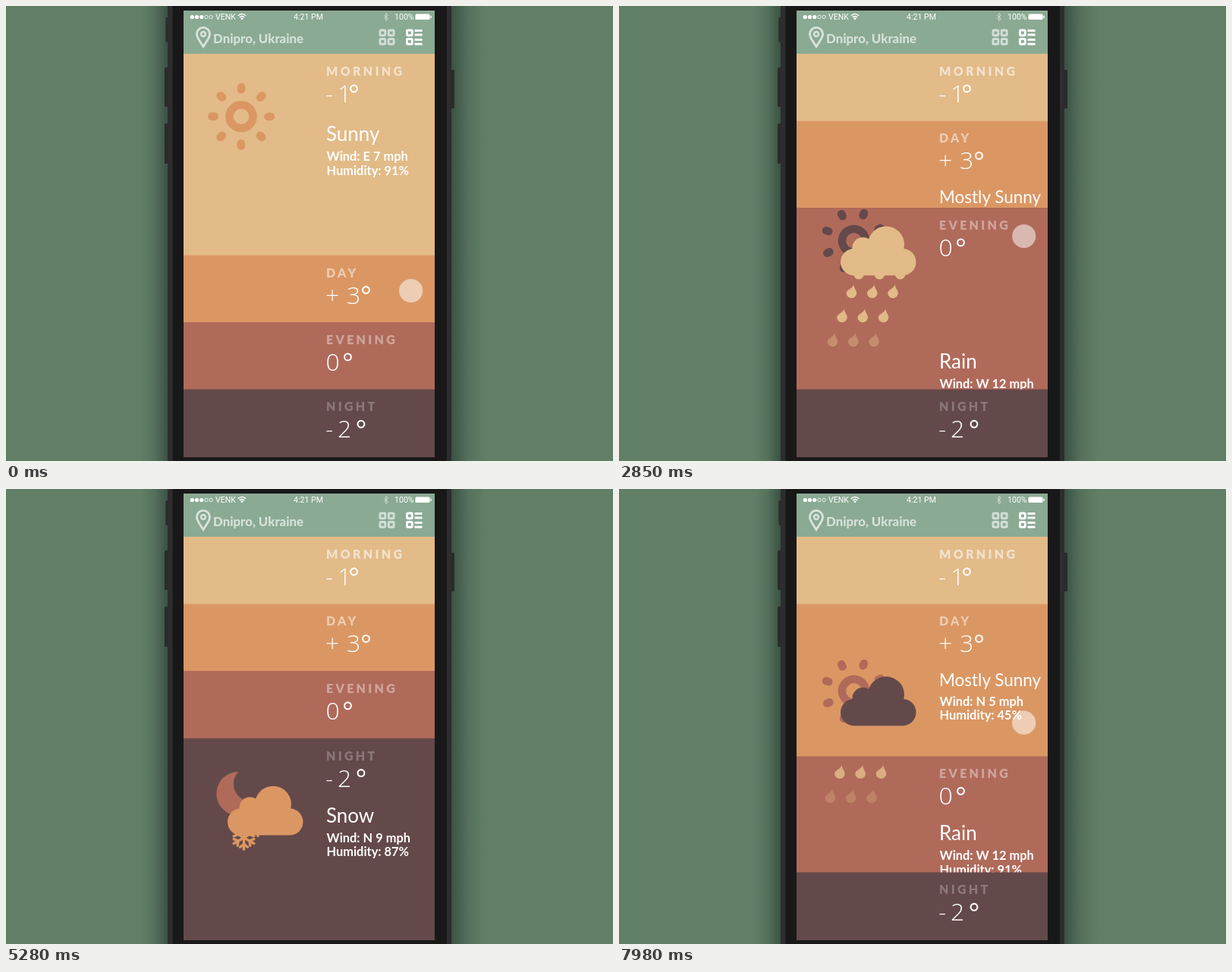
Write an HTML page that moves like this. It is 800x600 px and loops after 8 s.

```html
<!DOCTYPE html>
<html lang="en">
<head>
<meta charset="utf-8">
<title>Weather cards</title>
<style>
  html, body { margin: 0; width: 100%; height: 100%; overflow: hidden; background: #617f67; }
  #stage { display: block; width: 800px; height: 600px; }
  text { font-family: Lato, "Open Sans", sans-serif; fill: #fff; }
  .status { font: 10.6px Roboto, sans-serif; }
  .place { font-size: 16.8px; font-weight: 800; fill-opacity: .65; }
  .label { font-size: 16px; font-weight: 900; letter-spacing: 3.3px; }
  .temp { font: 300 32px "Open Sans", "Noto Sans", sans-serif; }
  .sky { font-weight: 400; }
  .info { font-size: 16.4px; font-weight: 700; }
</style>
</head>
<body>
<svg id="stage" viewBox="0 0 800 600"></svg>
<script>
const LOOP = 8000;
const UNIT = 88.4, GROW = 177.1, FIRST_TOP = 63, BOTTOM = 595;
const SAND = '#e2bb88', ORANGE = '#db9763', RED = '#b06a5a', PLUM = '#64494a';

const CARDS = [
  { name: 'MORNING', fill: SAND, tint: .58, sign: '-', digit: '1', digitX: 437, ring: 458.5,
    sky: 'Sunny', size: 26, base: 115, wind: 'E 7', humid: 91 },
  { name: 'DAY', fill: ORANGE, tint: .5, sign: '+', digit: '3', digitX: 449, ring: 474.5,
    sky: 'Mostly Sunny', size: 22.5, base: 108.5, wind: 'N 5', humid: 45 },
  { name: 'EVENING', fill: RED, tint: .4, sign: '', digit: '0', digitX: 421.5, ring: 450.5,
    sky: 'Rain', size: 26, base: 111, wind: 'W 12', humid: 91 },
  { name: 'NIGHT', fill: PLUM, tint: .26, sign: '-', digit: '2', digitX: 437, ring: 468,
    sky: 'Snow', size: 26, base: 111, wind: 'N 9', humid: 87 }
];

// step: cards opened or closed; lead: how long the finger rests before the drag
const DRAGS = [
  { at: 270, step: 1, y: 375.5, lead: 450 },
  { at: 2070, step: 1, y: 464, lead: 420 },
  { at: 3870, step: 1, y: 552.3, lead: 420 },
  { at: 5670, step: -1, y: 283, lead: 170 },
  { at: 7470, step: -1, y: 198, lead: 170 }
];

const clamp = (v, lo = 0, hi = 1) => Math.min(hi, Math.max(lo, v));
const wrap = v => v - Math.floor(v);

// cubic-bezier(x1, 0, x2, 1)
const bezier = (x1, x2) => x => {
  if (x <= 0) return 0;
  if (x >= 1) return 1;
  let lo = 0, hi = 1;
  for (let i = 0; i < 24; i++) {
    const s = (lo + hi) / 2, r = 1 - s;
    if (3 * r * r * s * x1 + 3 * r * s * s * x2 + s ** 3 < x) lo = s; else hi = s;
  }
  return lo * lo * (3 - 2 * lo);
};
const slide = bezier(.3, .1);
const follow = bezier(.3, .25);

const rect = (x, y, w, h, fill, extra = '') =>
  `<rect x="${x}" y="${y}" width="${w}" height="${h}" fill="${fill}" ${extra}/>`;
const circle = (x, y, r, extra = '') => `<circle cx="${x}" cy="${y}" r="${r}" ${extra}/>`;
const repeat = (n, make) => Array.from({ length: n }, (_, i) => make(i)).join('');

// Icons are drawn around the sun's centre
const sun = color => `<g class="sun" fill="${color}">
  ${circle(0, 0, 15.5, `fill="none" stroke="${color}" stroke-width="10.5"`)}
  ${repeat(8, i => rect(-5.3, -44, 10.6, 13.8, color, `rx="5.2" transform="rotate(${i * 45})"`))}</g>`;

const cloud = color => `<g fill="${color}">
  ${rect(-17.5, 10.6, 99.5, 35.2, color, 'rx="17.6"')}
  ${circle(42.5, 5, 24)}${circle(12, 9.5, 14)}${rect(12, 8, 52, 30, color)}</g>`;

const drops = color => repeat(5, () => `<g class="rain" fill="${color}">${repeat(3, i =>
  `<path transform="translate(${i * 27.3})" d="M3-11C3-6 6.8-4 6.8 0A6.8 6.8 0 0 1-6.8 0C-6.8-4 0-5 3-11Z"/>`)}</g>`);

const flakes = color => repeat(3, () =>
  `<g class="snow" fill="none" stroke="${color}" stroke-width="3.4" stroke-linecap="round">${repeat(6, i =>
    `<path transform="rotate(${i * 60})" d="M0 0V15.4M-5 12.5L0 8.5L5 12.5"/>`)}</g>`);

const moon = color =>
  `<path fill="${color}" d="M-3-38A29 29 0 1 0 25-2A23 23 0 0 1-3-38Z"/>`;

const ICONS = [
  sun(ORANGE),
  sun(RED) + cloud(PLUM),
  sun(PLUM) + drops(SAND) + cloud(SAND),
  moon(RED) + flakes(ORANGE) + cloud(ORANGE)
];

const cardMarkup = (c, i) => `<svg class="card" width="800" height="540">
  ${rect(234, 0, 331, 540, c.fill)}
  <g class="icon">${ICONS[i]}</g>
  <text class="label" x="422" y="29" fill-opacity="${c.tint}">${c.name}</text>
  <text class="temp" x="421" y="64">${c.sign}</text>
  <text class="temp" x="${c.digitX}" y="64">${c.digit}</text>
  ${circle(c.ring, 46, 4.4, 'fill="none" stroke="#fff" stroke-width="2.1"')}
  <g class="detail">
    <text class="sky" x="422" y="${c.base}" font-size="${c.size}">${c.sky}</text>
    <text class="info" x="422.5" y="${c.base + 26}">Wind: ${c.wind} mph</text>
    <text class="info" x="422.5" y="${c.base + 44.5}">Humidity: ${c.humid}%</text>
  </g></svg>`;

const box = (x, y) => rect(x, y, 6.8, 6.8, 'none', 'rx="1.2" stroke="#fff" stroke-width="2.9"');

const backdrop = `
  <defs>
    <linearGradient id="fade"><stop stop-color="#2f4438" stop-opacity="0"/>
      <stop offset=".5" stop-color="#2f4438" stop-opacity=".25"/>
      <stop offset="1" stop-color="#2f4438" stop-opacity=".8"/></linearGradient>
    <clipPath id="screen">${rect(234, 6, 331, BOTTOM - 6, '#000')}</clipPath>
  </defs>
  ${rect(0, 0, 800, 600, '#617f67')}
  ${rect(178, 0, 36, 600, 'url(#fade)')}
  ${rect(0, 0, 46, 600, 'url(#fade)', 'transform="matrix(-1 0 0 1 632 0)"')}
  ${[[210.5, 15, 33], [209, 81, 52], [209, 155, 53], [583, 84, 51]].map(([x, y, h]) =>
    rect(x, y, 8, h, '#2b2a2c', 'rx="1.5"')).join('')}
  ${rect(213, 0, 374, 600, '#2d2c2f')}
  ${rect(219.5, 0, 361.5, 600, '#191819')}`;

const header = `${rect(234, 6, 331, 57, '#8aaa93')}
  ${repeat(5, i => circle(245.3 + i * 6.2, 14.5, i < 3 ? 2.6 : 2.2,
    i < 3 ? 'fill="#fff"' : 'fill="none" stroke="#fff" stroke-width=".8"'))}
  <text class="status" x="276" y="18">VENK</text>
  <g fill="none" stroke="#fff" stroke-width="1.5">
    <path d="M305.8 12.8Q311 8.2 316.2 12.8M307.8 15Q311 12.2 314.2 15"/></g>
  <path d="M309 16.2Q311 14.8 313 16.2L311 18.4Z" fill="#fff"/>
  <text class="status" x="379" y="18">4:21 PM</text>
  <path d="M498 11.8L503.5 17L500.8 19.5V9.5L503.5 12L498 17.2" fill="none" stroke="#fff" stroke-opacity=".55"/>
  <text class="status" x="512" y="18">100%</text>
  ${rect(539.5, 10.5, 19, 7.6, '#fff', 'rx="1.5"')}${rect(559.3, 12.8, 1.4, 3.2, '#fff')}
  <g fill="none" stroke="#fff" stroke-opacity=".68" stroke-width="2.8">
    <path d="M260 53.5C256 47 251.4 42 251.4 37A8.6 8.6 0 0 1 268.6 37C268.6 42 264 47 260 53.5Z"/>
    ${circle(260, 37, 3, 'stroke-width="2.4"')}</g>
  <text class="place" x="273" y="48.5">Dnipro, Ukraine</text>
  <g opacity=".62">${box(493, 32)}${box(504.3, 32)}${box(493, 43.5)}${box(504.3, 43.5)}</g>
  ${box(528.5, 32)}${box(528.5, 43.5)}
  ${[31, 36.5, 43, 48.7].map(y => rect(538.5, y, 10, 2.9, '#fff')).join('')}`;

const stage = document.getElementById('stage');
stage.innerHTML = `${backdrop}${header}
  <g clip-path="url(#screen)">${CARDS.map(cardMarkup).join('')}</g>
  ${circle(533.7, 0, 15.6, 'id="touch" fill="#fff"')}`;

const all = (selector, root = stage) => [...root.querySelectorAll(selector)];
const cards = all('.card').map(el => ({
  el, icon: el.querySelector('.icon'), detail: el.querySelector('.detail'), sun: el.querySelector('.sun')
}));
const rain = all('.rain'), snow = all('.snow'), touch = document.getElementById('touch');
const move = (el, x, y) => el.setAttribute('transform', `translate(${x} ${y})`);

function drawCards(t) {
  const open = DRAGS.reduce((sum, d) => sum + d.step * slide((t - d.at) / 1510), 0);
  const iconY = FIRST_TOP + 82.7 + UNIT * open;
  cards.forEach((card, k) => {
    const top = FIRST_TOP + UNIT * k + GROW * clamp(k - open);
    card.el.setAttribute('y', top);
    move(card.icon, k ? 309.5 : 310, iconY - top);
    if (card.sun) card.sun.setAttribute('transform', `rotate(${t / 6 - (k ? 5 : 0)})`);

    let hidden = k ? 1 - slide((t - DRAGS[k - 1].at - 680) / 355) : 0;
    if (k === 3) hidden += slide((t - 5700) / 360);
    move(card.detail, 0, 212 * hidden);
  });
}

function drawRain(t) {
  const phase = wrap((t - 7470) / 360);
  rain.forEach((row, i) => {
    const age = phase + i;
    const y = age < 1 ? 42 + 12 * age + 9.5 * age * age : 63.5 + 32 * (age - 1);
    move(row, -3.5 - (y - 70) * .39, y);
    row.setAttribute('opacity', clamp((158 - y) / 58));
  });
}

function drawSnow(t) {
  snow.forEach((flake, i) => {
    const age = wrap((t - 4410) / 1200 + .3 - i / 3);
    move(flake, [22.5, 50, 4][i], 30 + 53 * age);
    flake.setAttribute('opacity', clamp((.6 - age) / .15));
  });
}

function drawTouch(t) {
  const drag = DRAGS.find(d => t >= d.at - d.lead && t < d.at + 1250);
  if (!drag) return touch.setAttribute('opacity', 0);
  const age = t - drag.at;
  const shown = Math.min(clamp((age + drag.lead) / 120), clamp((1250 - age) / 180));
  touch.setAttribute('opacity', .52 * shown);
  touch.setAttribute('cy', drag.y - drag.step * 203 * follow((age + 70) / 1650));
}

function draw(t) {
  drawCards(t);
  drawRain(t);
  drawSnow(t);
  drawTouch(t);
}

const start = performance.now();
function tick() {
  draw((performance.now() - start) % LOOP);
  requestAnimationFrame(tick);
}
draw(0);
requestAnimationFrame(tick);
</script>
</body>
</html>
```
